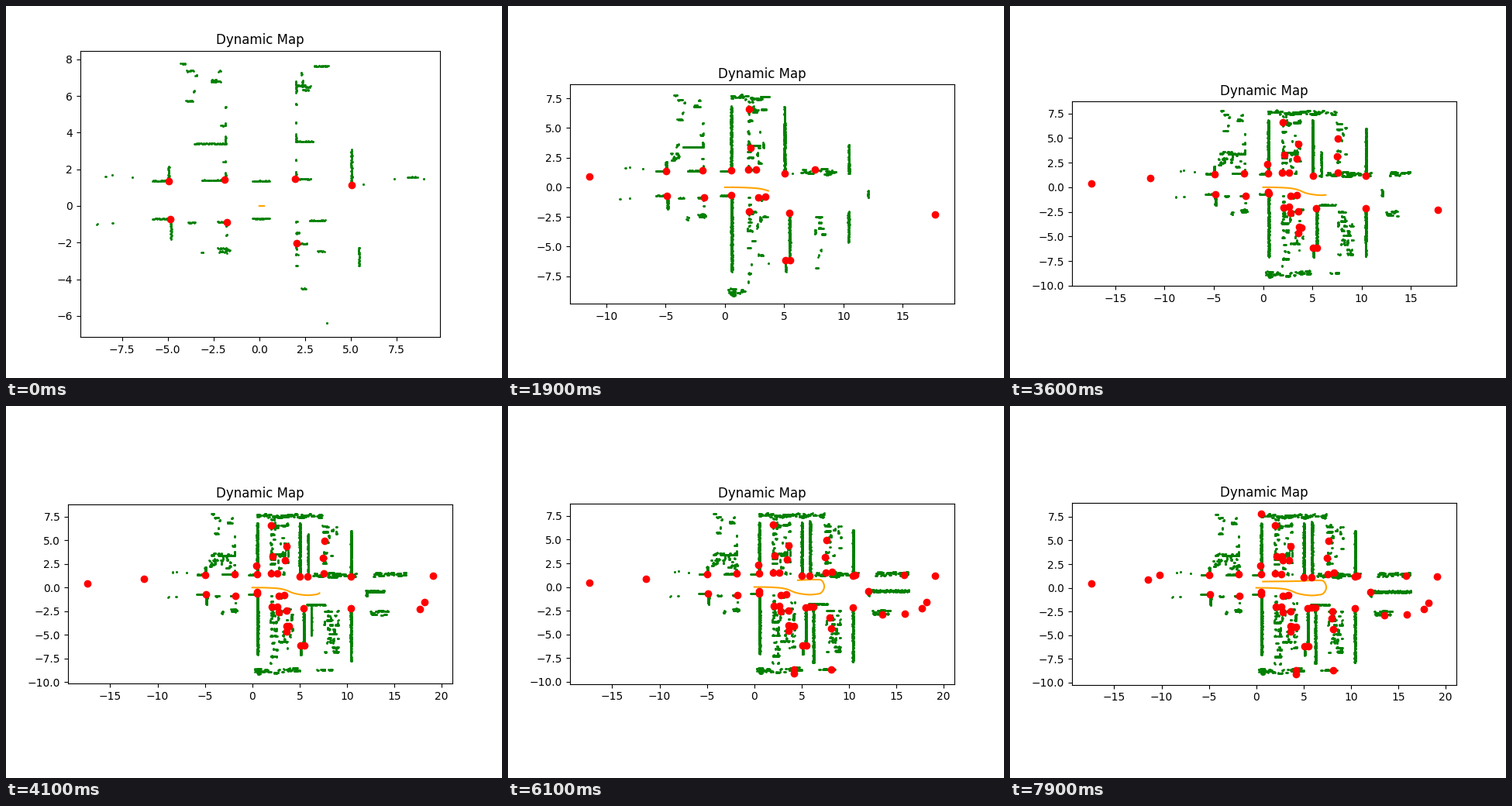
These frames come from a looping animation (640x480 px, 8 s). A matplotlib script:

```python
import numpy as np
import matplotlib.pyplot as plt
from matplotlib.animation import FuncAnimation

FRAMES, STEP = 80, 100
rng = np.random.default_rng(11)
hits = []  # blocks of (x, y, time seen)


def trace(x0, y0, x1, y1, t0=0, t1=0, noise=0.025):
    """Scan returns along a line, revealed from its start to its end."""
    n = max(2, int(np.hypot(x1 - x0, y1 - y0) * 28) + 1)
    f = np.linspace(0, 1, n)
    jx, jy = rng.uniform(-noise, noise, (2, n))
    hits.append(np.column_stack([x0 + f * (x1 - x0) + jx,
                                 y0 + f * (y1 - y0) + jy,
                                 t0 + f * (t1 - t0)]))


def shelves(x, side, y, pitch, lengths):
    """Evenly spaced shelf fronts, each with a short upright at its corner."""
    for k, size in enumerate(lengths):
        level = y + k * pitch
        trace(x, level, x + side * size, level)
        trace(x, level, x, level + np.sign(pitch) * min(0.4, size / 2))


def zone(t0, t1, x, y, w, h, n):
    """Short dashes on shelf levels, found roughly from left to right."""
    for _ in range(n):
        u, v, order = rng.random(3)
        size = 0.08 + 0.4 * rng.random() ** 2
        a, b = x + u * w, y + h * round(v * 9) / 9
        t = t0 + (t1 - t0) * (0.7 * u + 0.3 * order)
        if rng.random() < 0.6 or h < 1:
            trace(a, b, max(a, min(a + size, x + w)), b, t, t, 0.04)
        else:
            trace(a, b, a, min(b + size, y + h), t, t, 0.04)


# First scan: shelf corners beside the lane, posts and outliers
shelves(-1.85, -1, 1.4, 1.0, (1.3, 0.1, 1.7, 0.25, 0.02))
shelves(2.0, 1, 1.48, 1.02, (0.8, 0, 0.95, 0, 0.02, 0.5))
shelves(-1.8, -1, -0.88, -0.72, (0.5, 0, 0.45))
shelves(2.02, 1, -0.85, -0.6, (0.05, 0.15, 0.6, 0.1, 0.05))
for gate in (-4.93, 0.55):
    trace(gate - 0.9, 1.37, gate, 1.37)
    trace(gate - 0.9, -0.69, gate, -0.69)
for x0, x1, y in [(-4.27, -4.05, 7.75), (-2.6, -2.1, 6.8), (3, 3.75, 7.63),
                  (-3.9, -3.5, -0.9), (2.75, 3.6, -0.8), (3.2, 3.55, -2.47),
                  (2.3, 2.55, -4.52), (8.1, 8.6, 1.58)]:
    trace(x0, y, x1, y)
for x, y in [(-8.4, 1.63), (-8.05, 1.68), (-6.93, 1.55), (-8.87, -0.98),
             (-8.03, -0.93), (7.37, 1.48), (8.97, 1.48), (5.7, 1.17),
             (3.7, -6.4)]:
    trace(x, y, x, y)

# Long walls: x, near end, far end, span of discovery
for x, near, far, t0, t1 in [
        (-4.95, 1.35, 2.15, 0, 0), (-4.83, -0.9, -1.8, 0, 0),
        (5.03, 1.2, 6.8, -7, 14), (5.45, -2.25, -6.1, -5, 14),
        (0.53, 1.4, 6.8, 2, 7), (0.57, -0.7, -7.05, 1, 7),
        (5.12, -6.4, -7.1, 14, 18), (12.08, -0.3, -0.85, 14, 18),
        (10.45, 1.2, 6.0, 4, 34), (10.43, -2.1, -7.9, 1, 42),
        (5.9, 1.1, 6.9, 30, 44), (6.25, -2.1, -8.0, 38, 44)]:
    trace(x, near, x, far, t0, t1, 0.04)
    trace(x, near, x, far, t0 + 10, t1 + 10, 0.08)
for level in (-0.36, -0.46):
    trace(12.2, level, 16.3, level, 38, 45, 0.05)

# Shelving areas: span of discovery, x, y, width, height, dashes
for area in [
        (0, 0, -4.1, 5.5, 2.4, 2.1, 6), (0, 0, -3.3, -2.75, 1.7, 0.6, 3),
        (0, 0, 1.5, 6.2, 1.3, 1.4, 5), (1, 10, -3.4, -2.8, 1.8, 0.8, 5),
        (1, 55, -4.6, 1.9, 2.9, 1.7, 26), (1, 50, 1.9, 2.5, 0.5, 4.7, 20),
        (1, 50, 2.7, 1.4, 1.1, 5.8, 26), (1, 55, 1.9, -8, 0.7, 6.5, 42),
        (4, 55, 2.7, -6.3, 1.6, 5.2, 28), (1, 44, 0.2, 7.4, 7.2, 0.4, 50),
        (4, 44, 0, -9.1, 5.2, 0.6, 30), (30, 46, 6.8, -8.7, 1.7, 0, 10),
        (20, 50, 7.4, 2, 0.6, 5, 22), (24, 50, 8, 3, 1.2, 3.4, 9),
        (4, 50, 7.6, -6.8, 1.5, 4.3, 46), (1, 36, 6, 1.1, 5, 0.4, 26),
        (16, 46, 5.7, -1.8, 2, 0, 14), (24, 46, 12.6, 1.2, 3.6, 0.4, 22),
        (24, 46, 12.4, -2.9, 2, 0.6, 14)]:
    zone(*area)

hits = np.vstack(hits)

# Landmarks in order of discovery, spread evenly over each span
found = [
    (0, 0, [(-4.95, 1.35), (-1.9, 1.43), (1.95, 1.5), (5.05, 1.15),
            (-4.87, -0.72), (-1.78, -0.87), (2.05, -2.03)]),
    (2, 5, [(0.5, 1.4), (0.55, -0.67), (2.13, 3.3), (2.02, 6.6),
            (17.71, -2.27)]),
    (9, 18, [(-11.46, 0.9), (2.6, 1.48), (2.8, -0.88), (3.4, -0.8),
             (7.57, 1.48), (5.4, -2.17), (5.1, -6.15), (5.47, -6.15)]),
    (23, 35, [(-17.4, 0.42), (0.45, 2.35), (0.53, -0.45), (3.45, 2.9),
              (3.6, 4.4), (2.65, -2.0), (2.8, -2.57), (3.6, -2.47),
              (3.65, -4.05), (3.85, -4.1), (3.6, -4.62), (7.6, 4.95),
              (7.5, 3.12), (10.45, 1.17), (10.45, -2.15)]),
    (40, 46, [(19.1, 1.22), (18.2, -1.57), (5.85, 1.15), (8.2, 1.62),
              (10.7, 1.3), (15.85, 1.28), (12.05, -0.42), (13.5, -2.87),
              (15.9, -2.85), (6.25, -2.1), (8.0, -3.25), (8.15, -4.35),
              (8.15, -8.68)]),
    (50, 58, [(4.2, -4.13), (5.85, -2.1), (4.2, -8.72), (4.2, -9.15)]),
    (66, 76, [(-10.2, 1.32), (8.05, -2.45), (2.8, 2.95), (2.75, 3.3),
              (0.5, 7.79)]),
]
marks = np.array([(x, y, t) for a, b, spots in found
                  for (x, y), t in zip(spots, np.linspace(a, b, len(spots)))])

# Robot: time, x, y at a few points of its out, turn and return
poses = np.array([
    (-1, 0, 0), (0, 0.27, 0), (8, 2.02, -0.04), (14, 3.0, -0.13),
    (19, 3.65, -0.3), (24, 4.25, -0.56), (36, 6.35, -0.78), (41, 7.1, -0.58),
    (45, 7.4, 0.05), (49, 7.08, 0.72), (52, 6.55, 0.78), (61, 4.6, 0.71),
    (79, 0.7, 0.66),
])


def spline(keys, t):
    """Cubic Hermite curve through timed points."""
    k, p = keys[:, 0], keys[:, 1:]
    m = np.gradient(p, k, axis=0)
    i = np.clip(np.searchsorted(k, t, side="right") - 1, 0, len(k) - 2)
    h = (k[i + 1] - k[i])[:, None]
    s = (t - k[i])[:, None] / h
    return ((1 + 2 * s) * (1 - s) ** 2 * p[i] + s * (1 - s) ** 2 * h * m[i]
            + s * s * (3 - 2 * s) * p[i + 1] + s * s * (s - 1) * h * m[i + 1])


clock = np.arange(-1, FRAMES - 0.75, 0.25)
path = spline(poses, clock)

# View: start time, x range, y range
views = [
    (0, (-9.77, 9.87), (-7.16, 8.48)),
    (4, (-10.19, 19.19), (-9.79, 8.71)),
    (9, (-13.07, 19.35), (-9.80, 8.69)),
    (23, (-19.40, 19.62), (-10.03, 8.69)),
    (40, (-19.46, 21.14), (-10.13, 8.80)),
    (58, (-19.46, 21.14), (-10.24, 8.79)),
    (76, (-19.46, 21.14), (-10.24, 8.96)),
]

fig, ax = plt.subplots(figsize=(6.4, 4.8), dpi=100)
ax.set_aspect("equal")
ax.set_title("Dynamic Map")
scan, = ax.plot([], [], "go", markersize=1)
trail, = ax.plot([], [], color="orange")
pins, = ax.plot([], [], "ro")


def update(i):
    _, xlim, ylim = [v for v in views if v[0] <= i][-1]
    ax.set_xlim(xlim)
    ax.set_ylim(ylim)
    for line, data in ((scan, hits), (pins, marks)):
        line.set_data(*data[data[:, 2] <= i, :2].T)
    trail.set_data(*path[clock <= i].T)
    return scan, trail, pins


anim = FuncAnimation(fig, update, frames=FRAMES, interval=STEP,
                     repeat=True, repeat_delay=0)
plt.show()
```
